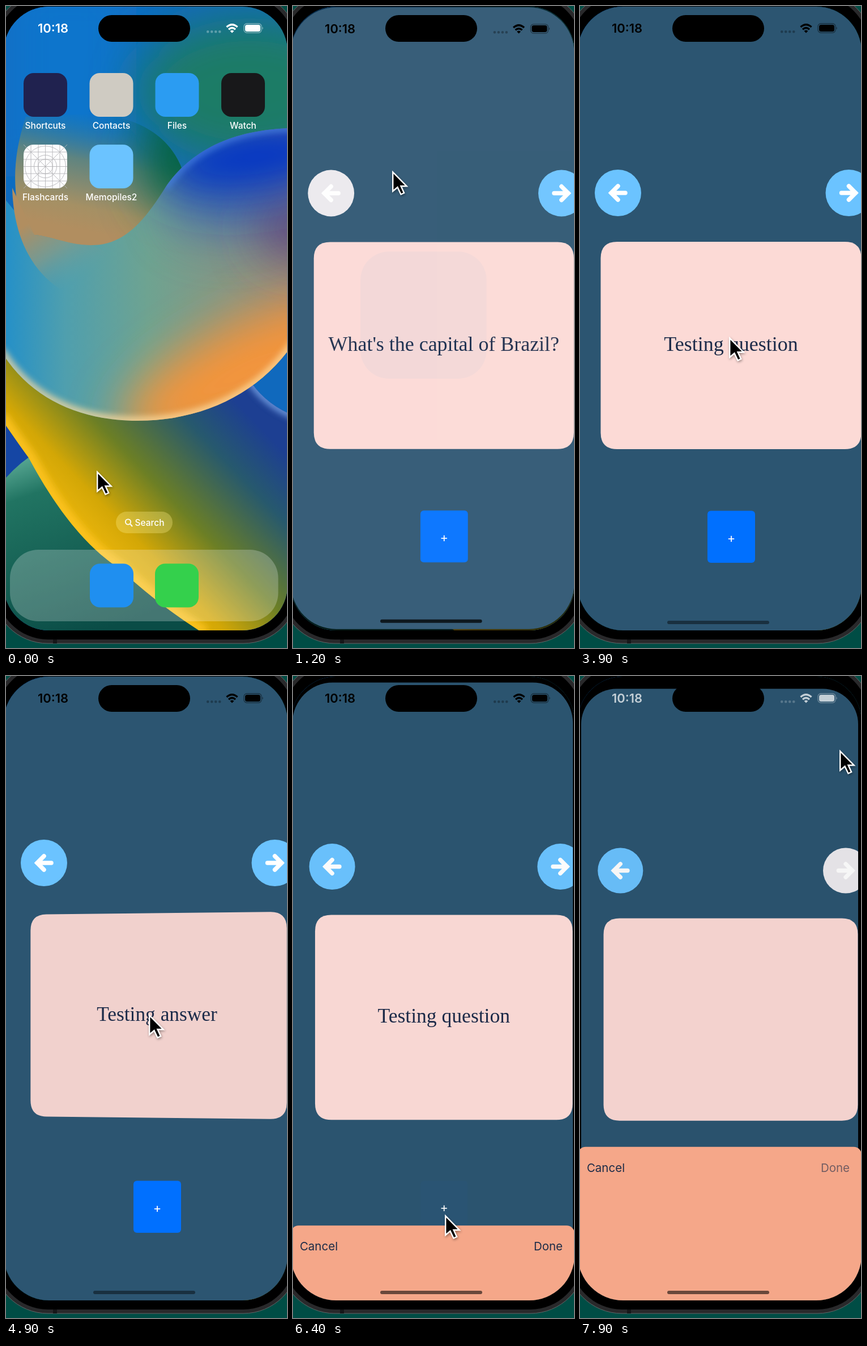
Write an HTML page that moves like this. It is 496 px wide and 1130 px high and loops after 8 s.

```html
<!DOCTYPE html>
<html lang="en">
<head>
<meta charset="utf-8">
<title>Flash card app</title>
<style>
  html, body { margin: 0; width: 100%; height: 100%; overflow: hidden; background: #004d45; }
  svg { display: block; width: 496px; height: 1130px; font-family: Inter, Roboto, sans-serif; }
  text { text-anchor: middle; }
  .label { font-size: 15.5px; font-weight: 500; fill: #fff; }
  .clock { font-size: 22px; font-weight: 600; }
  .action { font-size: 20.5px; fill: #1d2c48; }
  #question { font: 36px "Liberation Serif", "Noto Serif", serif; fill: #1c2b49; }
</style>
</head>
<body>
<svg viewBox="0 0 496 1130">
  <defs>
    <clipPath id="screenClip"><rect x="-4" y="1" width="501" height="1098" rx="80"/></clipPath>
    <clipPath id="windowClip"><rect id="windowRect"/></clipPath>
    <clipPath id="blobClip"><use href="#blob"/></clipPath>
    <clipPath id="waveClip"><use href="#wave"/></clipPath>
    <clipPath id="ribbonClip"><use href="#ribbon"/></clipPath>
    <filter id="soft" x="-100%" y="-100%" width="300%" height="300%"><feGaussianBlur stdDeviation="42"/></filter>
    <filter id="rim" x="-20%" y="-20%" width="140%" height="140%"><feGaussianBlur stdDeviation="6"/></filter>
    <filter id="shadow" x="-50%" y="-50%" width="200%" height="200%">
      <feDropShadow dx="1" dy="2" stdDeviation="2" flood-opacity=".4"/>
    </filter>
    <linearGradient id="blobFill" gradientUnits="userSpaceOnUse" x1="150" y1="190" x2="110" y2="390">
      <stop offset="0" stop-color="#2c7a96" stop-opacity="0"/><stop offset=".4" stop-color="#5f8480"/>
      <stop offset=".8" stop-color="#a59064"/><stop offset="1" stop-color="#b18e60"/>
    </linearGradient>
    <linearGradient id="curlFill" gradientUnits="userSpaceOnUse" x1="35" y1="385" x2="112" y2="495">
      <stop offset="0" stop-color="#b18e60"/><stop offset=".5" stop-color="#829a8a" stop-opacity=".8"/>
      <stop offset="1" stop-color="#5fa0a2" stop-opacity="0"/>
    </linearGradient>
    <linearGradient id="waveFill">
      <stop offset="0" stop-color="#218fca"/><stop offset=".22" stop-color="#4f9fae"/>
      <stop offset=".5" stop-color="#6ea391"/><stop offset="1" stop-color="#9a8c78"/>
    </linearGradient>
    <linearGradient id="ribbonFill" gradientUnits="userSpaceOnUse" x1="120" y1="960" x2="400" y2="690">
      <stop offset="0" stop-color="#f6bd10"/><stop offset=".24" stop-color="#d3a706"/>
      <stop offset=".48" stop-color="#6c7f25"/><stop offset=".78" stop-color="#27596d"/>
      <stop offset="1" stop-color="#1d3f92"/>
    </linearGradient>
    <linearGradient id="leafFill" x1="0" y1="0" x2=".4" y2="1">
      <stop offset="0" stop-color="#6bb9a4"/><stop offset=".25" stop-color="#217462"/>
      <stop offset="1" stop-color="#0a4c46"/>
    </linearGradient>
    <path id="blob" d="M35 195C10 270 10 330 34 410L60 440H260L312 290C285 215 210 190 140 190Z"/>
    <path id="wave" d="M510 215C400 216 325 255 281 320C240 385 205 421 150 421C110 421 80 405 50 403L-10 330V605C40 690 130 730 232 730C350 730 450 680 510 590Z"/>
    <path id="ribbon" d="M-10 590V724Q25 775 40 795Q115 935 200 990Q270 1055 350 1105H510V722Q455 700 428 655Z"/>
    <g id="statusIcons">
      <text class="clock" x="83" y="47" fill="currentColor">10:18</text>
      <g fill="currentColor" opacity=".3">
        <rect x="354" y="43" width="4.5" height="4.5" rx="2"/><rect x="361" y="43" width="4.5" height="4.5" rx="2"/>
        <rect x="368" y="43" width="4.5" height="4.5" rx="2"/><rect x="375" y="43" width="4.5" height="4.5" rx="2"/>
      </g>
      <path d="M389.5 37Q399 28.5 408.5 37M393 41.2Q399 36 405 41.2" fill="none" stroke="currentColor" stroke-width="3.4"/>
      <path d="M395.5 44Q399 41 402.5 44L399 47.5Z" fill="currentColor"/>
      <rect x="420" y="31" width="31" height="16" rx="5" fill="none" stroke="currentColor" stroke-width="1.3" opacity=".45"/>
      <rect x="422" y="33" width="27" height="12" rx="3.5" fill="currentColor"/>
      <path d="M452.5 36.5Q455 39 452.5 41.5Z" fill="currentColor" opacity=".5"/>
    </g>
    <path id="arrow" d="M13 0H-12M0-12L-12 0L0 12" fill="none" stroke="#fff" stroke-width="7.5" stroke-linecap="round"/>
  </defs>

  <rect width="496" height="1130" fill="#004d45"/>
  <rect x="-24" y="-25" width="541" height="1147" rx="98" fill="#29292b" stroke="#626466"/>
  <path d="M83 1115H90V1122H83Z" fill="#171719"/>
  <rect x="-17" y="-18" width="527" height="1133" rx="91"/>

  <g clip-path="url(#screenClip)">
    <g id="home">
      <g id="wallpaper">
        <rect x="-10" width="520" height="1110" fill="#1069bd"/>
        <rect x="-10" y="-60" width="240" height="360" fill="#0d74cc" filter="url(#soft)"/>
        <ellipse cx="430" cy="150" rx="200" ry="130" fill="#1b7c66" filter="url(#soft)"/>
        <use href="#blob" fill="url(#blobFill)"/>
        <g clip-path="url(#blobClip)">
          <ellipse cx="310" cy="270" rx="65" ry="100" fill="#04603c" filter="url(#soft)"/>
        </g>
        <rect x="-10" y="720" width="130" height="200" fill="#1546a4"/>
        <path d="M-10 842Q20 805 55 785L220 1000L360 1110H-10Z" fill="url(#leafFill)"/>
        <use href="#ribbon" fill="url(#ribbonFill)"/>
        <g clip-path="url(#ribbonClip)" fill="none" filter="url(#rim)">
          <path d="M-10 724Q25 775 40 795Q115 935 200 990Q270 1055 350 1105" stroke="#ffc524" stroke-width="26" opacity=".8"/>
          <path d="M428 655Q455 700 510 722" stroke="#6f9be0" stroke-width="12"/>
        </g>
        <use href="#wave" fill="url(#waveFill)"/>
        <g clip-path="url(#waveClip)">
          <ellipse cx="420" cy="645" rx="235" ry="85" fill="#f4943a" transform="rotate(-26 420 645)" filter="url(#soft)"/>
          <ellipse cx="395" cy="365" rx="110" ry="50" fill="#4a72a8" opacity=".7" filter="url(#soft)"/>
          <ellipse cx="515" cy="390" rx="70" ry="55" fill="#5a4480" filter="url(#soft)"/>
          <ellipse cx="440" cy="265" rx="185" ry="72" fill="#0636c6" transform="rotate(-8 440 265)" filter="url(#soft)"/>
          <path d="M510 215C400 216 325 255 281 320" fill="none" stroke="#4a86ea" stroke-width="12" opacity=".7" filter="url(#rim)"/>
          <path d="M-10 605C40 690 130 730 232 730C350 730 450 680 510 590" fill="none" stroke="#ffdc9e" stroke-width="14" opacity=".8" filter="url(#rim)"/>
        </g>
        <path d="M11 320C13 410 50 490 140 520C210 510 215 440 150 421C110 421 80 405 50 403Z" fill="url(#curlFill)"/>
      </g>
      <g id="icons">
        <g id="tiles"></g>
        <g fill="none" stroke="#b5b5b8" stroke-width=".9">
          <path d="M31 244L108 321M108 244L31 321M31 282.5H108M69.500 244V321M44 244V321M95 244V321M31 257H108M31 308H108M57 244V321M82 244V321M31 270H108M31 295H108"/>
          <circle cx="69.500" cy="282.500" r="36"/><circle cx="69.500" cy="282.500" r="20"/><circle cx="69.500" cy="282.500" r="13"/>
        </g>
        <rect x="194" y="890" width="100" height="38" rx="19" fill="#ffee8a" opacity=".32"/>
        <path d="M219.500 912L223 916" stroke="#fff" stroke-width="2"/>
        <circle cx="215.500" cy="908" r="4.600" fill="none" stroke="#fff" stroke-width="1.800"/>
        <text class="label" x="253.500" y="914.500">Search</text>
      </g>
      <use href="#statusIcons" color="#fff"/>
      <rect id="homeDim" x="-10" width="520" height="1110"/>
    </g>

    <rect id="backdrop" x="-10" width="520" height="1110"/>
    <g id="app" clip-path="url(#windowClip)">
      <g id="content">
        <rect x="-10" width="520" height="1110" fill="#2c5571"/>
        <g transform="translate(67 329)"><circle id="prev" r="41"/><use href="#arrow"/></g>
        <g transform="translate(474.5 329) scale(-1 1)"><circle id="next" r="41"/><use href="#arrow"/></g>
        <path id="card" fill="#fcdad6"/>
        <path id="cardShade"/>
        <text id="question"></text>
        <rect id="addButton" x="225" y="888.500" width="84" height="91.500" rx="6" fill="#0070ff"/>
        <text x="267" y="944" font-size="22" fill="#fff">+</text>
        <g id="splash">
          <rect x="-10" width="520" height="1110" fill="#fdfbfe"/>
          <rect x="119" y="432" width="223" height="224" rx="50" fill="#6bc3ff"/>
        </g>
        <rect id="appDim" x="-10" width="520" height="1110"/>
      </g>
    </g>
    <g id="sheet">
      <rect x="-4" width="501" height="1150" rx="14" fill="#f5a789"/>
      <text class="action" x="45.500" y="44">Cancel</text>
      <text class="action" id="done" x="450.500" y="44">Done</text>
    </g>
    <g id="appStatus"><use href="#statusIcons"/></g>
    <rect id="homeBar" x="-90" y="-3" width="180" height="6" rx="3"/>
  </g>
  <rect x="163" y="16" width="162" height="47" rx="23.500"/>
  <path id="cursor" d="M1.200 2.500V36L9.500 29L15.500 41.500L21 39L15.500 27H25.500Z" stroke="#fff" stroke-width="2.400" filter="url(#shadow)"/>
</svg>
<script>
const LOOP = 8000, STEP = 100;
const $ = id => document.getElementById(id);
const set = (id, attrs) => {
  for (const name in attrs) $(id).setAttribute(name, attrs[name]);
};
const clamp = v => Math.max(0, Math.min(1, v));
const mix = (a, b, p) => a + (b - a) * p;
const ease = u => (1 - Math.cos(Math.PI * clamp(u))) / 2;
// Critically damped spring from 0 to 1
const spring = (ms, rate) => {
  const u = Math.max(0, ms) * rate;
  return 1 - (1 + u) * Math.exp(-u);
};

const tiles = [
  ['Shortcuts', 31, 118, '#20224f'], ['Contacts', 147.5, 118, '#cfcbc2'],
  ['Files', 263.5, 118, '#2b9cf2'], ['Watch', 380, 118, '#18181a'],
  ['Flashcards', 31, 244, '#fdfdfe'], ['Memopiles2', 147.5, 244, '#6bc3ff'],
];
const tile = (x, y, fill) => `<rect x="${x}" y="${y}" width="77" height="77" rx="18" fill="${fill}"/>`;
$('tiles').innerHTML =
  '<rect x="7" y="957" width="473.500" height="126" rx="50" fill="#fff" opacity=".24"/>' +
  tile(148, 981.5, '#1f8ff0') + tile(263, 981.5, '#34d04c') +
  tiles.map(([name, x, y, fill]) =>
    `${tile(x, y, fill)}<text class="label" x="${x + 38.5}" y="${y + 98}">${name}</text>`).join('');

// Time, x, y of the pointer tip
const pointerKeys = [
  [0, 160, 818], [50, 160, 818], [500, 178, 291], [1200, 175, 290], [1500, 175, 290],
  [2900, 475, 338], [3300, 475, 338], [4000, 252, 595], [5400, 252, 595],
  [6100, 268, 948], [6550, 268, 948], [7250, 458, 130], [LOOP, 458, 130],
];
function pointerAt(t) {
  const i = pointerKeys.findIndex(key => key[0] > t);
  const [t0, x0, y0] = pointerKeys[i - 1], [t1, x1, y1] = pointerKeys[i];
  const p = ease((t - t0) / (t1 - t0));
  return [mix(x0, x1, p), mix(y0, y1, p)];
}

function drawCard(angle, label) {
  const cx = 266.5, cy = 597.5, w = 230, h = 182.5, r = 29;
  const sin = Math.sin(angle), cos = Math.cos(angle);
  const zoom = x => 1400 / (1400 + w * Math.abs(sin) - x * sin);
  const at = (x, y) => `${cx + x * cos * zoom(x)} ${cy + y * zoom(x)}`;
  const corner = (x0, y0, x1, y1, x2, y2) => `${at(x0, y0)}Q${at(x1, y1)} ${at(x2, y2)}`;
  const d = 'M' + [
    corner(-w, r - h, -w, -h, r - w, -h), corner(w - r, -h, w, -h, w, r - h),
    corner(w, h - r, w, h, w - r, h), corner(r - w, h, -w, h, -w, h - r),
  ].join('L') + 'Z';
  set('card', { d });
  set('cardShade', { d, opacity: Math.abs(sin) / 2 });
  set('question', { transform: `translate(${cx} ${cy}) scale(${cos * zoom(0)} ${zoom(0)})`, y: 9.5 });
  $('question').textContent = label;
}

const halfTurn = turn => (turn < .5 ? turn : turn - 1) * Math.PI;

function render(t) {
  // Opening the app from its icon
  const open = spring(t - 620, .0138);
  const width = mix(77, 501, open ** .75);
  const left = mix(186.5, 246.5, open ** .9) - width / 2;
  const top = mix(244, 1, open ** 1.6), bottom = mix(321, 1099, open);
  const scale = width / 501;
  const place = `translate(${left + 4 * scale} ${top - scale}) scale(${scale})`;
  set('wallpaper', { transform: `translate(247 550) scale(${1 + .08 * open}) translate(-247 -550)` });
  set('icons', {
    opacity: clamp(1 - 2.5 * open),
    transform: `translate(186 282) scale(${1 + .4 * open}) translate(-186 -282)`,
  });
  set('homeDim', { opacity: .68 * open });
  set('splash', { opacity: clamp((1215 - t) / 265) });

  // Sheet sliding up and away, pushing the app back
  const lift = t < 7692 ? spring(t - 6350, .0125) : 1 - spring(t - 7692, .0125);
  const back = 1 - .09 * lift;
  set('backdrop', { opacity: t > 5000 ? 1 : 0 });
  set('app', { opacity: clamp(open * 5) });
  if (lift > 0) {
    set('windowRect', { x: 246.5 - 250.5 * back, y: 1 + 80 * lift, width: 501 * back, height: 1098 * back, rx: mix(80, 14, lift) });
    set('content', { transform: `translate(246.5 ${1 + 80 * lift}) scale(${back}) translate(-246.5 -1)` });
  } else {
    set('windowRect', { x: left, y: top, width, height: bottom - top, rx: mix(18, 80, open ** .6) });
    set('content', { transform: place });
  }
  set('appDim', { opacity: .13 * lift });
  set('sheet', { transform: `translate(0 ${1099 - 1011 * lift})` });
  set('done', { opacity: t < 7600 ? 1 : .6 });

  const light = lift > .2;
  set('appStatus', {
    transform: place,
    color: light ? '#fff' : '#000',
    opacity: light ? .62 + .38 * lift : clamp(open * 5),
  });
  set('homeBar', {
    transform: `translate(${left + 248 * scale} ${bottom - 14 * scale}) scale(${scale})`,
    opacity: open === 0 ? 0 : lift > 0 ? .57 : t >= 1000 && t < 1400 ? .75 : .43,
  });

  // Cards
  const turnOver = ease((t - 4150) / 540), turnBack = ease((t - 4845) / 530);
  const angle = turnBack > 0 ? halfTurn(turnBack) : -halfTurn(turnOver);
  const answered = turnOver >= .5 && turnBack < .5;
  const added = t >= 7750;
  drawCard(angle, t < 3300 ? "What's the capital of Brazil?"
    : added ? '' : answered ? 'Testing answer' : 'Testing question');
  const buttonFill = active => ({ fill: active ? '#6bc3ff' : '#eceaee' });
  set('prev', buttonFill(t >= 3300));
  set('next', buttonFill(!added));
  set('addButton', { opacity: t >= 6200 && t < 6600 ? .03 : 1 });

  set('cursor', { transform: `translate(${pointerAt(t).join(' ')})` });
}

function tick() {
  render(Math.floor(performance.now() % LOOP / STEP) * STEP);
  requestAnimationFrame(tick);
}
tick();
</script>
</body>
</html>
```
